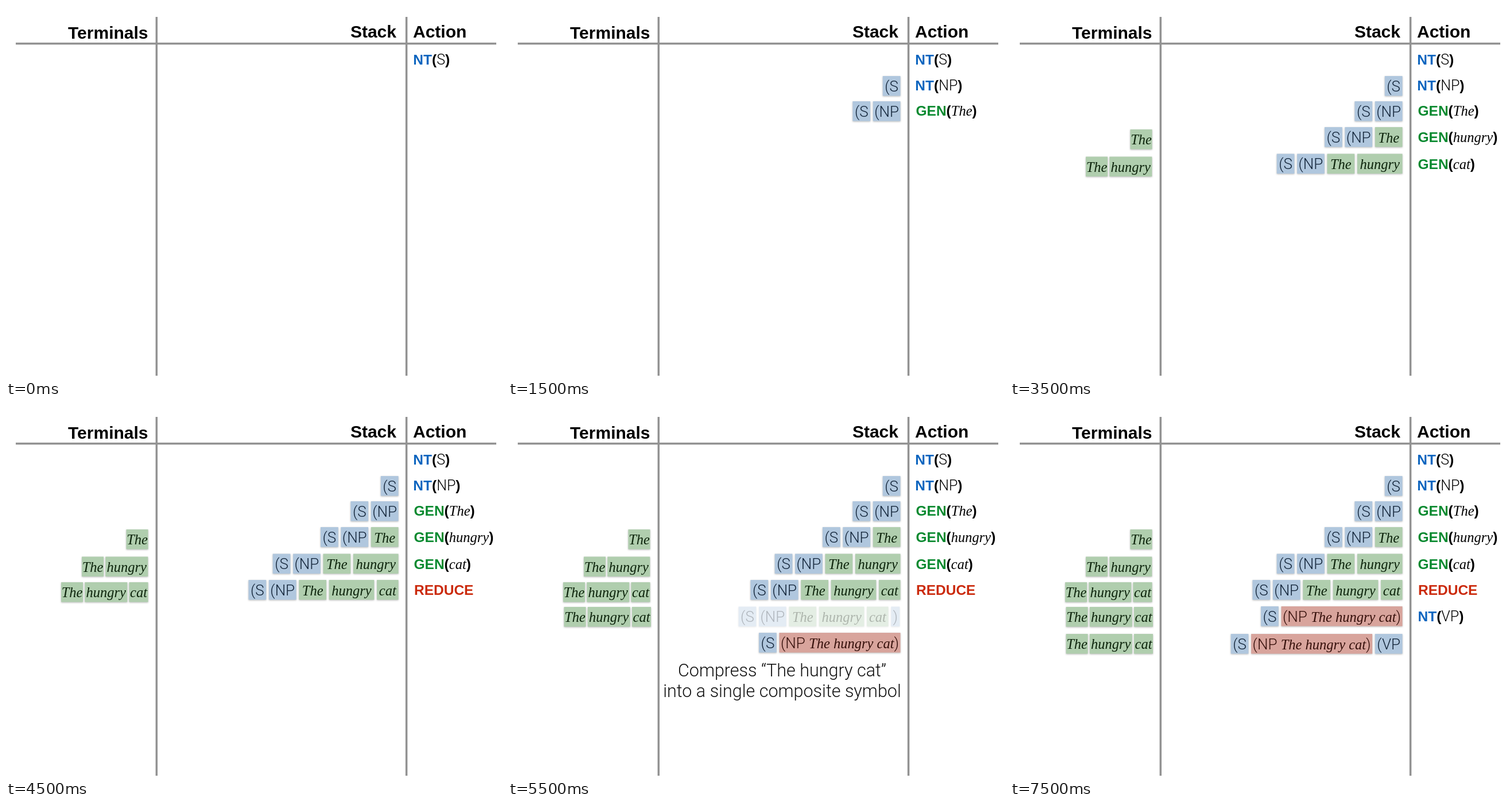
Recreate the animation shown at these times as an HTML page. Size 864 px wide and 648 px high, loop 8000 ms.

```html
<!DOCTYPE html>
<html lang="en">
<head>
<meta charset="utf-8">
<title>Parser stack</title>
<style>
  html, body { margin: 0; width: 100%; height: 100%; overflow: hidden; background: #fff; }
  svg { display: block; width: 864px; height: 648px; }
  text { white-space: pre; }
  line { stroke: #929292; stroke-width: 3.5; }
  rect { filter: drop-shadow(0 1px 1.5px rgba(0, 0, 0, .28)); }
  .head { font: bold 30px "Liberation Sans", Arial, sans-serif; }
  .bold { font: bold 24.5px "Liberation Sans", Arial, sans-serif; }
  .light { font: 300 26px Roboto, sans-serif; }
  .action .light { font-size: 25px; }
  .word { font: italic 24.5px "Liberation Serif", Times, serif; }
  .caption { font: 300 30.5px Roboto, sans-serif; fill: #111; }
  .end { text-anchor: end; }
  .mid { text-anchor: middle; }
</style>
</head>
<body>
<svg id="stage" viewBox="0 0 864 648">
  <path d="M17 65.5H854M262.3 19V644M697.6 19V644" fill="none" stroke="#929292" stroke-width="3.5"/>
  <text class="head end" x="247.5" y="56.5">Terminals</text>
  <text class="head end" x="680" y="55">Stack</text>
  <text class="head" x="709" y="55">Action</text>
</svg>
<script>
const STEP = 500, STEPS = 16;
const stage = document.getElementById('stage');
const parts = [];

const BLUE = { fill: '#b0c7de', ink: '#13253a' };
const GREEN = { fill: '#b0ceae', ink: '#0c230b' };
const RED = { fill: '#d8a49c', ink: '#350f0a' };
const PHRASE = 'The hungry cat';
const NP = `(NP ${PHRASE})`;

// label: [width on the stack, palette, width among the terminals]
const BOXES = {
  '(S': [30.7, BLUE], '(NP': [47.7, BLUE], '(VP': [47.7, BLUE], ')': [15, BLUE],
  The: [47.7, GREEN, 38], hungry: [78.6, GREEN, 74], cat: [37.5, GREEN, 33],
  [NP]: [211, RED],
};

function add(parent, tag, attrs, text = '') {
  const node = document.createElementNS('http://www.w3.org/2000/svg', tag);
  for (const key in attrs) node.setAttribute(key, attrs[key]);
  node.textContent = text;
  return parent.appendChild(node);
}

// A group visible from step `from` until step `to`.
function group(from, to = STEPS, attrs = {}) {
  const node = add(stage, 'g', attrs);
  parts.push({ node, from, to });
  return node;
}

// Words in serif italic, symbols in light sans.
function addRuns(text, label) {
  for (const run of label.split(/(The hungry cat|The|hungry|cat)/).filter(Boolean))
    add(text, 'tspan', { class: PHRASE.includes(run) ? 'word' : 'light' }, run);
}

// Lays boxes out from the right edge leftwards.
function row(parent, labels, right, top, gap, baseline, column) {
  for (const label of [...labels].reverse()) {
    const box = BOXES[label], width = box[column], { fill, ink } = box[1];
    right -= width;
    add(parent, 'rect', { x: right, y: top, width, height: 34.5, fill });
    addRuns(add(parent, 'text', { class: 'mid', x: right + width / 2, y: top + baseline, fill: ink }), label);
    right -= gap;
  }
}

function stack(from, labels, top, to, right = 683.5, attrs) {
  row(group(from, to, attrs), labels, right, top, 4.7, 26.5, 0);
}

function terminals(from, count, right, top) {
  row(group(from), PHRASE.split(' ').slice(0, count), right, top, 3.2, 26, 2);
}

function action(from, x, y, verb, color, argument) {
  const text = add(group(from), 'text', { class: 'action', x, y });
  add(text, 'tspan', { class: 'bold', fill: color }, verb);
  if (!argument) return;
  add(text, 'tspan', { class: 'bold' }, '(');
  addRuns(text, argument);
  add(text, 'tspan', { class: 'bold' }, ')');
}

const NT = ['NT', '#0c65bf'], GEN = ['GEN', '#0a8a30'];
action(0, 709.3, 101.5, ...NT, 'S');
action(1, 709.3, 146.5, ...NT, 'NP');
action(3, 710.5, 191, ...GEN, 'The');
action(5, 710.5, 236.5, ...GEN, 'hungry');
action(7, 710.5, 283.5, ...GEN, 'cat');
action(9, 711, 329, 'REDUCE', '#cb2a0c');
action(14, 710.5, 375, ...NT, 'VP');

const words = PHRASE.split(' ');
const open = ['(S', '(NP'];
stack(1, ['(S'], 122);
stack(2, open, 166);
stack(4, [...open, 'The'], 211);
stack(6, [...open, 'The', 'hungry'], 257.5);
stack(8, [...open, ...words], 303);
stack(10, [...open, ...words, ')'], 349.5, 11, 682.3);
stack(11, [...open, ...words, ')'], 349.5, 13, 682.3, { opacity: .33 });
stack(11, ['(S', NP], 395, 13);
stack(13, ['(S', NP], 349);
stack(15, ['(S', NP, '(VP'], 397);

terminals(4, 1, 247.5, 215);
terminals(6, 2, 247.3, 262.5);
terminals(8, 3, 247.5, 307);
terminals(10, 3, 249, 350);
terminals(15, 3, 249, 397);

const caption = group(11, 13, { class: 'caption mid' });
add(caption, 'text', { x: 477.5, y: 470.5 }, `Compress “${PHRASE}”`);
add(caption, 'text', { x: 477.5, y: 506.5 }, 'into a single composite symbol');

function draw(now) {
  const step = Math.floor(now / STEP) % STEPS;
  for (const { node, from, to } of parts)
    node.style.display = step >= from && step < to ? '' : 'none';
  requestAnimationFrame(draw);
}
draw(performance.now());
</script>
</body>
</html>
```
